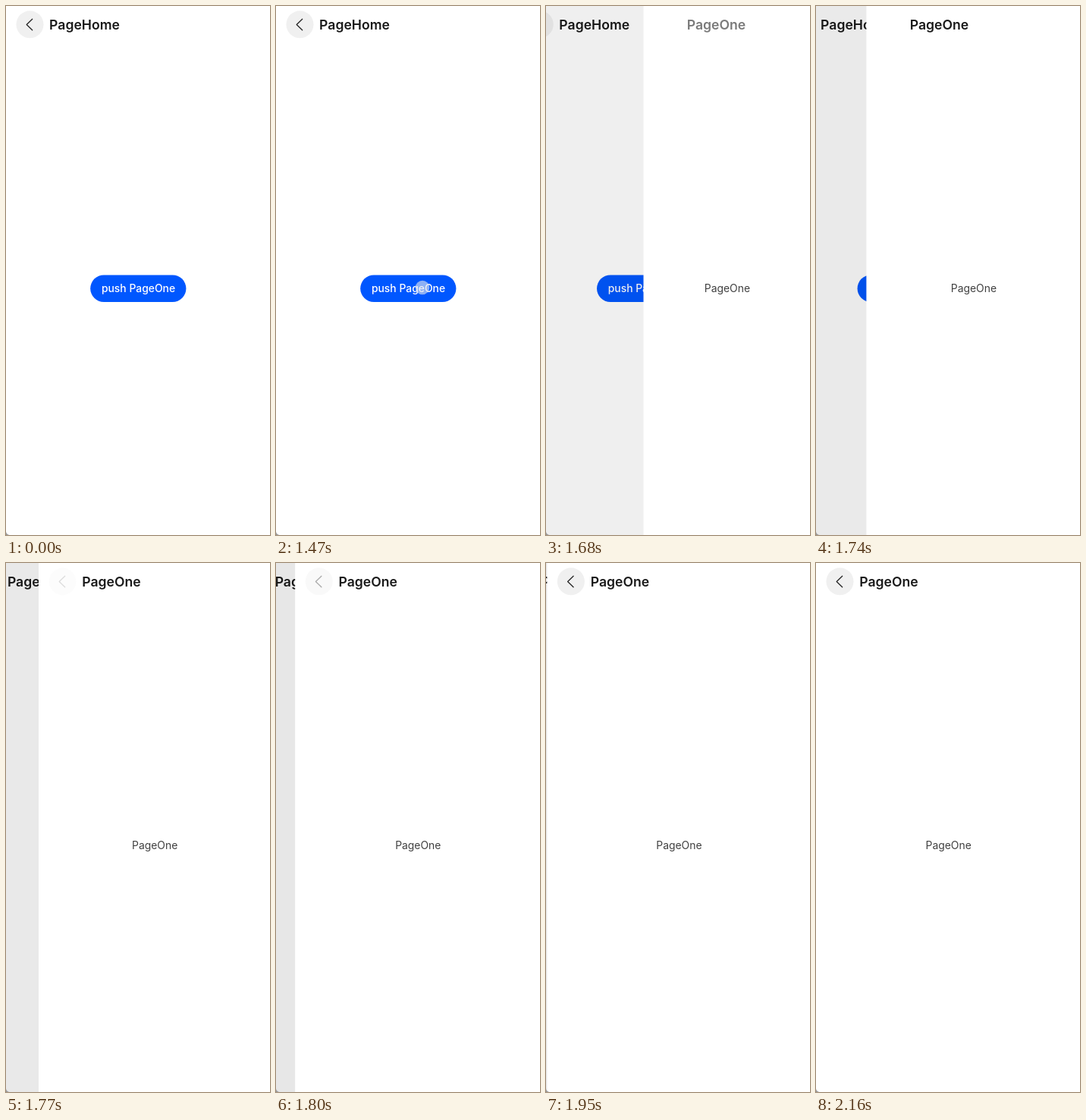
These frames come from a looping animation (348x697 px, 2.73 s). An HTML page:

```html
<!DOCTYPE html>
<html lang="en">
<head>
<meta charset="utf-8">
<title>Page push</title>
<style>
  html, body { margin: 0; width: 100%; height: 100%; overflow: hidden; background: #fff; }
  svg { display: block; width: 348px; height: 697px; }
  text { font-family: Inter, "Noto Sans", sans-serif; }
  .title { font-size: 17.6px; font-weight: 600; fill: #191919; }
  .label { font-size: 13.9px; text-anchor: middle; fill: #404040; }
  .push { font-weight: 500; fill: #fff; }
  .disc { fill: #f0f0f0; }
  .chevron { fill: none; stroke: #222; stroke-width: 1.25; stroke-linecap: round; stroke-linejoin: round; }
</style>
</head>
<body>
<svg viewBox="0 0 348 697">
  <defs>
    <g id="back">
      <circle class="disc" cx="31.5" cy="24.3" r="18"/>
      <path class="chevron" d="M34.7 17.2 27.2 24.5 34.7 31.8"/>
    </g>
  </defs>
  <rect width="348" height="697" fill="#fff"/>

  <g id="homeHeader">
    <use href="#back"/>
    <text class="title" x="57.1" y="30.6">PageHome</text>
  </g>
  <g id="homeBody">
    <rect x="111.2" y="354.4" width="126.2" height="35.6" rx="17.8" fill="#0057ff"/>
    <text class="label push" x="174.5" y="377.3">push PageOne</text>
  </g>
  <circle id="touch" cx="193" cy="371" r="9.3" fill="#e4e7ee" opacity=".62"/>
  <rect id="shade" width="348" height="697"/>

  <rect id="page" width="348" height="697" fill="#fff"/>
  <g id="pageHeader">
    <use id="pageBack" href="#back"/>
    <text id="pageTitle" class="title" x="57.3" y="30.6">PageOne</text>
  </g>
  <text id="pageBody" class="label" x="174.7" y="377.3">PageOne</text>

  <path d="M0 692.5Q.6 696.4 4.5 697H0Z" fill="#999"/>
</svg>
<script>
  const LOOP = 2730, STEP = 30, WIDTH = 348;
  const TOUCH = [1470, 1560];

  // Left edge of the incoming page: [ms, px]
  const EDGE = [
    [1530, 348], [1560, 343], [1590, 300], [1620, 236], [1650, 178],
    [1680, 128.5], [1710, 95], [1740, 66.4], [1770, 43], [1800, 25.2],
    [1830, 13.5], [1860, 6.8], [1890, 3.8], [1920, 2.1], [1980, 0.7], [2160, 0]
  ];

  const el = id => document.getElementById(id);
  const ramp = (t, from, to) => Math.min(1, Math.max(0, (t - from) / (to - from)));
  const slide = (id, x) => el(id).setAttribute("transform", `translate(${x} 0)`);
  const fade = (id, a) => el(id).setAttribute("opacity", a);

  function edgeAt(t) {
    const i = EDGE.findIndex(([time]) => time >= t);
    if (i === 0) return WIDTH;
    if (i < 0) return 0;
    const [t0, x0] = EDGE[i - 1], [t1, x1] = EDGE[i];
    return x0 + (x1 - x0) * ramp(t, t0, t1);
  }

  function draw(now) {
    const t = Math.floor((now % LOOP) / STEP) * STEP;
    const x = edgeAt(t), p = 1 - x / WIDTH;

    slide("homeHeader", -63 * p);
    slide("homeBody", -70 * p);
    fade("touch", t >= TOUCH[0] && t < TOUCH[1] ? 0.62 : 0);
    fade("shade", 0.1 * p);

    slide("page", x);
    slide("pageHeader", x);
    slide("pageBody", x / 2);
    fade("pageBody", p > 0 ? 1 : 0);
    fade("pageTitle", ramp(t, 1600, 1740));
    fade("pageBack", ramp(t, 1750, 1880));
  }

  function tick() {
    draw(performance.now());
    requestAnimationFrame(tick);
  }
  tick();
</script>
</body>
</html>
```
